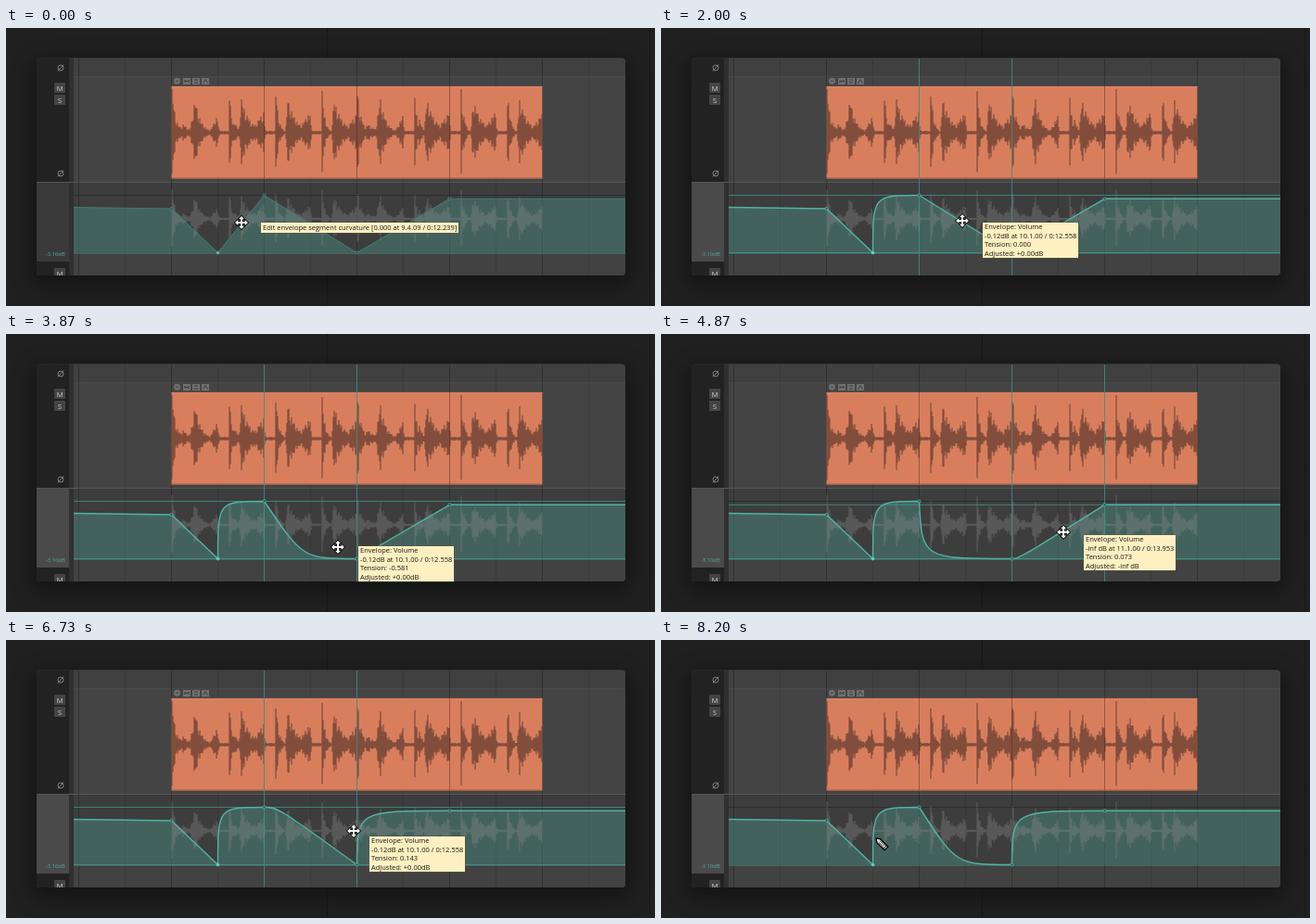
Write an HTML page that moves like this. It is 700x300 px and loops after 8270 ms.

```html
<!DOCTYPE html>
<html lang="en">
<head>
<meta charset="utf-8">
<title>Envelope curvature</title>
<style>
  html, body { margin: 0; width: 100%; height: 100%; overflow: hidden; background: #202020; }
  #stage { position: relative; width: 700px; height: 300px; overflow: hidden; background: #202020; }
  #shadow { position: absolute; left: 33px; top: 33px; width: 635px; height: 234px; border-radius: 4px;
    box-shadow: 0 7px 22px 5px rgba(0, 0, 0, .36); }
  svg { position: absolute; inset: 0; }
  text { font-family: "Open Sans", "Noto Sans", sans-serif; }
  .button rect { fill: #444; }
  .button text { fill: #c6c6c6; font-size: 8px; text-anchor: middle; }
  .phase { fill: none; stroke: #898989; stroke-width: .9; }
  .dots { stroke: #101010; stroke-dasharray: 1.5 1.5; }
  #tip { position: absolute; left: 0; top: 0; padding: 0 2px 0 2px; box-sizing: border-box; white-space: pre;
    background: #fff0c2; color: #191714; box-shadow: 0 0 0 .5px #5b5546;
    font: 500 7.5px/9.6px "Open Sans", "Noto Sans", sans-serif; }
  #tip.hover { line-height: 10.5px; }
</style>
</head>
<body>
<div id="stage">
  <div id="shadow"></div>
  <svg width="700" height="300" viewBox="0 0 700 300">
    <defs>
      <clipPath id="window"><rect x="33" y="32.5" width="635" height="234.5" rx="4"/></clipPath>
      <clipPath id="arrange"><rect x="73" y="33" width="595" height="234"/></clipPath>
    </defs>
    <path class="dots" d="M346.5 0V32M346.5 267V300M694.5 0V300"/>
    <g clip-path="url(#window)">
      <rect x="33" y="32" width="635" height="235" fill="#444"/>
      <rect x="33" y="32" width="35" height="235" fill="#222"/>
      <rect x="68" y="32" width="5" height="235" fill="#303030"/>
      <rect x="73" y="32" width="595" height="20" fill="#404040"/>
      <rect x="73" y="167" width="595" height="77" fill="#3d3d3d"/>
      <rect x="73" y="244" width="595" height="23" fill="#424242"/>
      <rect id="panel" x="33" y="167" width="35" height="85"/>
      <path d="M33 166.5H668" stroke="#555"/>
      <path d="M73 52.5H668" stroke="#494949"/>
      <g id="grid" stroke="#000"></g>
      <path d="M73 180.5H668" stroke="#282828" opacity=".8"/>

      <g class="phase">
        <circle cx="59" cy="43" r="3"/><path d="M56 46.5L62 39.5"/>
        <circle cx="59" cy="157" r="3"/><path d="M56 160.5L62 153.5"/>
      </g>
      <g class="button">
        <rect x="52" y="59" width="12" height="11" rx="1"/><text x="58" y="67.5">M</text>
        <rect x="52" y="72" width="12" height="11" rx="1"/><text x="58" y="80.7">S</text>
        <rect x="52" y="259" width="12" height="11" rx="1"/><text x="58" y="267.5">M</text>
      </g>
      <text x="43" y="245.7" font-size="5.8" fill="#55aaa0">-3.10dB</text>

      <g fill="#707070">
        <circle cx="184.5" cy="57.2" r="3.4"/>
        <rect x="191" y="54" width="8" height="7"/>
        <rect x="201" y="54" width="8" height="7"/>
        <rect x="211" y="54" width="8" height="7"/>
      </g>
      <path d="M183 57.2H186M193 59V56L195 58L197 56V59M203 56H207M203 59H207M212.5 59.5L215 55.5L217.5 59.5"
        fill="none" stroke="#3c3c3c"/>
      <rect x="178.5" y="63" width="400" height="99.5" fill="#d87e5d"/>
      <path d="M178.5 162H578.5" stroke="#a65c43"/>
      <path d="M178.5 63.3H578.5" stroke="#e58e6d" stroke-width=".6"/>
      <path id="wave" stroke="#5b382d" stroke-width=".85"/>
      <path d="M278.5 63V162M378.5 63V162M478.5 63V162" stroke="#3a2019" opacity=".5" stroke-width=".8"/>

      <g clip-path="url(#arrange)">
        <path id="area" fill="#4f9a8d" opacity=".4"/>
        <path id="ghost" stroke="#8c8c8c" stroke-width=".8" opacity=".55"/>
        <path id="guides" fill="none" stroke="#3f988a" stroke-width=".8"/>
        <path id="curve" fill="none" stroke-linejoin="round"/>
        <g id="nodes" fill="#34534d"></g>
      </g>
    </g>
  </svg>
  <div id="tip"></div>
  <svg width="700" height="300" viewBox="0 0 700 300">
    <g id="cross">
      <path d="M0 -7L3 -3.7H1V-1H3.7V-3L7 0L3.7 3V1H1V3.7H3L0 7L-3 3.7H-1V1H-3.7V3L-7 0L-3.7 -3V-1H-1V-3.7H-3Z"
        fill="#fff" stroke="#000" stroke-width="1.6" paint-order="stroke"/>
    </g>
    <g id="pencil">
      <g transform="rotate(45)">
        <path d="M-8.5 0L-4.5 -2.7H7V2.7H-4.5Z" fill="#fff" stroke="#000" stroke-width="1.4"/>
        <path d="M-4 -1H4.5M-4 1H4.5M5 -2.5V2.5" stroke="#000" stroke-width=".9"/>
      </g>
    </g>
  </svg>
</div>
<script>
const LOOP = 8270, STEP = LOOP / 124;
const $ = id => document.getElementById(id);
const round = v => v.toFixed(2);

// Envelope points; the three middle segments can be bent.
const points = [[73, 193.5], [178.5, 195], [228.5, 242.5], [278.5, 180.5], [378.5, 242.5], [478.5, 184.3], [668, 184.3]];
const FIRST = 2;
const heads = ["-inf dB at 9.3.00 / 0:11.860", "-0.12dB at 10.1.00 / 0:12.558", "-inf dB at 11.1.00 / 0:13.953"];
const adjusted = ["-inf dB", "+0.00dB", "-inf dB"];

// [time, tension] for each bendable segment
const tension = [
  [[330, 0], [1200, -.306], [1600, -1]],
  [[2000, 0], [2670, .595], [3000, .95], [3470, -.38], [3870, -.581], [4150, -.97],
   [6420, -.97], [6730, .267], [7000, .45], [7500, -.6]],
  [[4750, 0], [5270, .55], [5400, .6], [5800, -.803], [6070, -1]]
];
// [time, x, y, tooltip dx, tooltip dy]
const pointer = [
  [0, 254, 210, 21, 0], [330, 254, 210, 21, 3], [1200, 256, 206, 21, 3], [1600, 257, 190, 22, 3],
  [1670, 257, 190, 22, 1], [1940, 325, 208, 22, 1], [2000, 325, 208, 22, 2], [2670, 335, 184, 24, -8],
  [3000, 341, 170, 22, 3], [3470, 366, 222, 23, 3], [3870, 358, 230, 22, -1], [4150, 356, 240, 22, 0],
  [4270, 356, 240, 22, 0], [4660, 430, 212, 22, 1], [4750, 430, 212, 22, 3], [5270, 461, 226, 23, 3],
  [5400, 463, 230, 23, 3], [5800, 417, 201, 23, 3], [6070, 410, 194, 22, 3], [6200, 410, 194, 22, 1],
  [6400, 355, 238, 22, 1], [6730, 377, 203, 16, 6], [7000, 374, 196, 22, 3], [7500, 362, 229, 22, 3],
  [7620, 362, 229, 22, 0], [7800, 229, 213, 21, 1], [7930, 229, 215, 21, 1], [8140, 238, 220, 21, 1]
];
// [start, end, segment]
const drags = [[330, 1670, 0], [2000, 4270, 1], [4750, 6200, 2], [6420, 7620, 1]];
// [start, end, label]
const hovers = [
  [0, 330, "0.000 at 9.4.09 / 0:12.239"], [1870, 2000, "0.000 at 10.2.85 / 0:12.884"],
  [4600, 4750, "0.000 at 11.3.06 / 0:14.312"], [7760, 7990, "-1.00 at 9.3.01 / 0:11.867"]
];

function sample(keys, t) {
  if (t <= keys[0][0]) return keys[0].slice(1);
  const i = keys.findIndex(k => k[0] > t);
  if (i < 0) return keys[keys.length - 1].slice(1);
  const a = keys[i - 1], b = keys[i];
  const u = (t - a[0]) / (b[0] - a[0]), e = u * u * (3 - 2 * u);
  return a.slice(1).map((v, j) => v + (b[j + 1] - v) * e);
}

const active = (spans, t) => spans.find(s => t >= s[0] && t < s[1]);

// Both handles sit on the level side, moved towards the corner by the tension.
function bend([x0, y0], [x1, y1], k) {
  const x = k > 0 ? x0 + (x1 - x0) * k : x1 + (x1 - x0) * k;
  const y = k > 0 ? y0 : y1;
  return `C${round(x)} ${y} ${round(x)} ${y} ${x1} ${y1}`;
}

// Two-bar drum pattern: [position, peak, attack, decay]
const hits = [
  [0, 47, .5, 4], [12, 9, 10, 8], [25, 36, 6, 6], [49, 18, 9, 1.2], [62, 46, .6, 2.2], [67, 14, 3, 4],
  [75, 36, 3, 9], [99, 22, 15, 1], [112, 47, .6, 3], [125, 36, 2.5, 9], [149, 22, 15, 1],
  [162, 45, .6, 3], [175, 35, 3, 9], [199, 20, 14, .8]
];
function level(x) {
  const p = x % 200;
  let top = 2;
  for (const [at, peak, attack, decay] of hits) {
    const d = p - at;
    top = Math.max(top, d < 0 ? peak * (1 + d / attack) : peak * Math.exp(-d / decay));
  }
  return top;
}
function wave(mid, scale) {
  let d = "";
  for (let x = 0; x < 400; x++) {
    const ripple = x % 3 ? .72 + .16 * Math.sin(x * 7.3) : 1;
    const a = level(x) * ripple * scale;
    d += `M${x + 179} ${round(mid - a)}V${round(mid + a * .94)}`;
  }
  return d;
}

$("wave").setAttribute("d", wave(113, 1));
$("ghost").setAttribute("d", wave(206, .68));
for (let x = 78.5, i = 0; x < 668; x += 50, i++)
  $("grid").innerHTML += `<path d="M${x} 33V267" opacity="${i % 2 ? .1 : .24}"/>`;
$("nodes").innerHTML = points.slice(1, 6)
  .map(([x, y], i) => `<circle cx="${x}" cy="${y}" r="1.6" ${i === 1 ? 'fill="#6fd6c5"' : ""}/>`).join("");

function place(el, x, y, shown) {
  el.setAttribute("transform", `translate(${round(x)} ${round(y)})`);
  el.style.display = shown ? "" : "none";
}

function draw(t) {
  const bends = tension.map(keys => sample(keys, t)[0]);
  const drag = active(drags, t), hover = active(hovers, t);
  const selected = t >= drags[0][0];

  let d = "M" + points[0].join(" ");
  for (let i = 1; i < points.length; i++) {
    const k = bends[i - 1 - FIRST];
    d += k ? bend(points[i - 1], points[i], k) : "L" + points[i].join(" ");
  }
  $("curve").setAttribute("d", d);
  $("curve").setAttribute("stroke", selected ? "#4fb3a3" : "#45857b");
  $("curve").setAttribute("stroke-width", selected ? 1.4 : .8);
  $("area").setAttribute("d", d + "V244H73Z");
  $("nodes").setAttribute("stroke", selected ? "#55b8a8" : "#4b8c82");
  $("nodes").setAttribute("stroke-width", .8);
  $("panel").setAttribute("fill", selected ? "#4a4a4a" : "#3a3a3a");

  let lines = "";
  if (drag) {
    const [a, b] = points.slice(FIRST + drag[2], FIRST + drag[2] + 2);
    lines = [a, b].map(([x, y]) => `M${x} 33V267M73 ${y}H668`).join("");
  }
  $("guides").setAttribute("d", lines);

  const [x, y, dx, dy] = sample(pointer, t);
  const drawing = t >= 7990;
  place($("cross"), x, y, !drawing);
  place($("pencil"), x, y, drawing);

  const tip = $("tip");
  tip.style.display = drag || hover ? "" : "none";
  tip.className = drag ? "" : "hover";
  tip.style.transform = `translate(${Math.round(x + dx)}px, ${Math.round(y + dy)}px)`;
  if (drag) {
    const s = drag[2];
    tip.textContent = `Envelope: Volume\n${heads[s]}\nTension: ${bends[s].toFixed(3)}\nAdjusted: ${adjusted[s]}`;
  } else if (hover) {
    tip.textContent = `Edit envelope segment curvature [${hover[2]}]`;
  }
}

const start = performance.now();
function tick() {
  const t = (performance.now() - start) % LOOP;
  draw(Math.floor((t + 4) / STEP) % 124 * STEP);
  requestAnimationFrame(tick);
}
draw(0);
requestAnimationFrame(tick);
</script>
</body>
</html>
```
